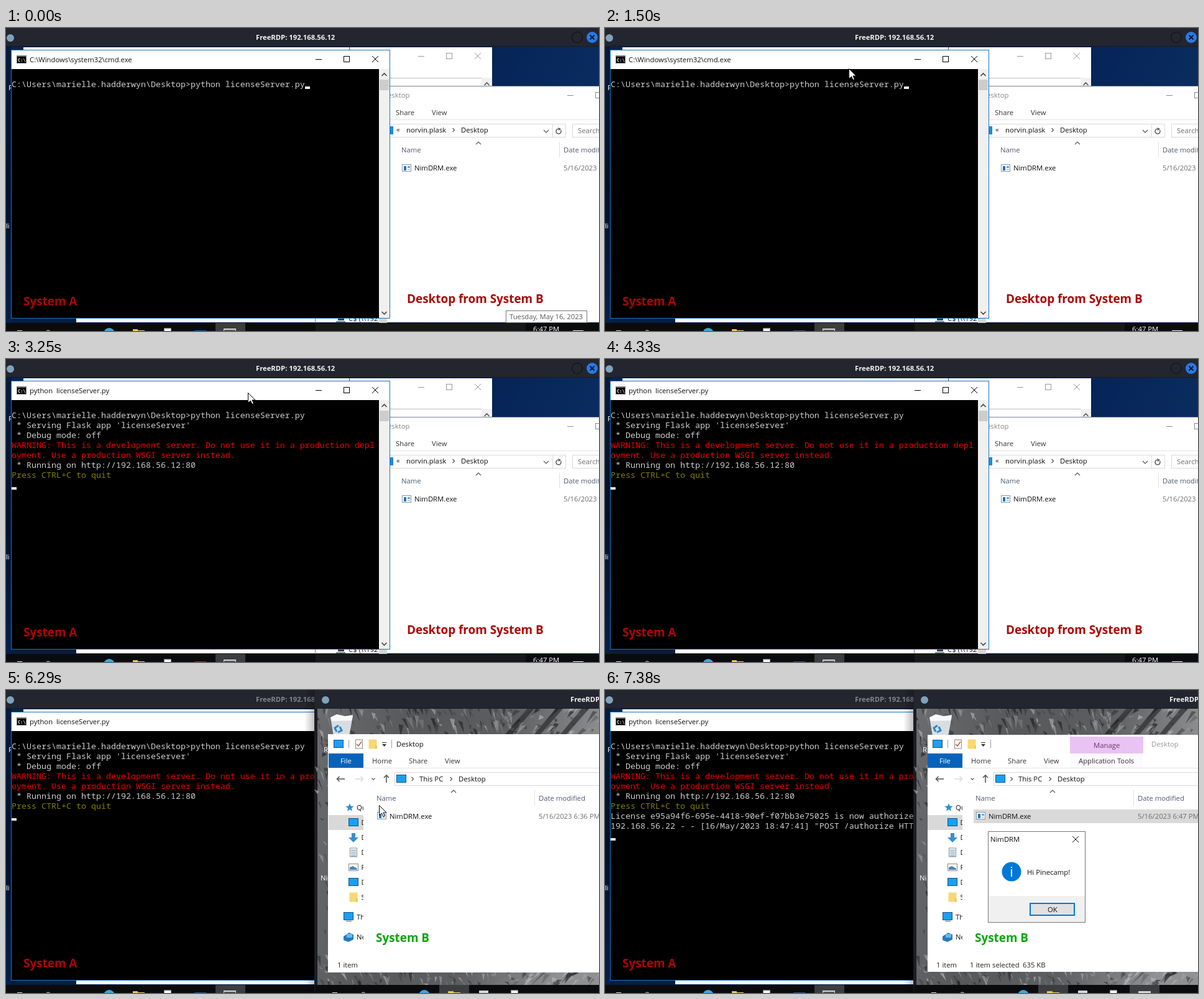
Write an HTML page with a canvas that moves like this. It is 954 px wide and 487 px high and loops after 8000 ms.

```html
<!DOCTYPE html>
<html lang="en">
<head>
<meta charset="utf-8">
<title>License server demo</title>
<style>
html, body { margin: 0; height: 100%; overflow: hidden; background: #000; }
canvas { display: block; width: 100%; height: 100%; }
</style>
</head>
<body>
<canvas id="stage" width="954" height="487"></canvas>
<script>
const ctx = document.getElementById('stage').getContext('2d');
const LOOP = 8000;
const UI = '11.3px "Open Sans", sans-serif';
const BAR = 'bold 11.25px "Noto Sans", sans-serif';
const LABEL = 'bold 18.9px "Open Sans", sans-serif';
const MONO = '13.333px "Noto Sans Mono", monospace';
const BLUE = '#0078d7', SCREEN = '#18a0f5', HEAD = '#4c5a70', FOLDER = '#f8d775';

// Drawing helpers
function rect(x, y, w, h, color) {
  ctx.fillStyle = color;
  ctx.fillRect(x, y, w, h);
}
function frame(x, y, w, h, color, width = 1) {
  ctx.strokeStyle = color;
  ctx.lineWidth = width;
  ctx.strokeRect(x + width / 2, y + width / 2, w - width, h - width);
}
function disc(x, y, r, color) {
  ctx.fillStyle = color;
  ctx.beginPath();
  ctx.arc(x, y, r, 0, 7);
  ctx.fill();
}
function text(str, x, y, color = '#111', font = UI) {
  ctx.fillStyle = color;
  ctx.font = font;
  ctx.fillText(str, x, y);
}
function trace(points) {
  ctx.beginPath();
  points.forEach(([x, y]) => ctx.lineTo(x, y));
}
function line(points, color, width = 1) {
  trace(points);
  ctx.strokeStyle = color;
  ctx.lineWidth = width;
  ctx.stroke();
}
function shape(points, color) {
  trace(points);
  ctx.closePath();
  ctx.fillStyle = color;
  ctx.fill();
}
function chevron(x, y, dx, dy, color = '#555', width = 1.2) {
  const [px, py] = dx ? [0, Math.abs(dx)] : [Math.abs(dy), 0];
  line([[x - px - dx / 2, y - py - dy / 2], [x + dx / 2, y + dy / 2],
        [x + px - dx / 2, y + py - dy / 2]], color, width);
}
function cross(x, y, r, color, width = 1) {
  line([[x - r, y - r], [x + r, y + r]], color, width);
  line([[x + r, y - r], [x - r, y + r]], color, width);
}
function windowButtons(x, y, color) {
  rect(x - 5, y, 10, 1, color);
  frame(x + 40, y - 5, 10, 10, color);
  cross(x + 91, y, 5, color);
}
function clipped(x, y, w, h, draw) {
  ctx.save();
  ctx.beginPath();
  ctx.rect(x, y, w, h);
  ctx.clip();
  draw();
  ctx.restore();
}
function gradient(x0, y0, x1, y1, ...colors) {
  const g = ctx.createLinearGradient(x0, y0, x1, y1);
  colors.forEach((c, i) => g.addColorStop(i / (colors.length - 1), c));
  return g;
}

// Small icons, placed by their centre
function monitor(x, y) {
  rect(x - 8, y - 7, 16, 13, '#17507e');
  rect(x - 7, y - 6, 14, 11, SCREEN);
}
function folder(x, y, w = 13, h = 15) {
  rect(x - w / 2, y - h / 2, w, h, FOLDER);
  rect(x + w / 2 - 2, y + h / 2 - 5, 2, 5, '#e5b94c');
}
function page(x, y, h = 15) {
  rect(x - 6, y - h / 2, 12, h, '#fafafa');
  frame(x - 6, y - h / 2, 12, h, '#8b8b8b');
}
function program(x, y) {
  rect(x - 8, y - 6, 15, 12, '#fff');
  frame(x - 8, y - 6, 15, 12, '#8996a3');
  rect(x - 5, y - 3, 4, 7, '#1976c5');
  rect(x + 1, y - 3, 4, 3, '#61a6dc');
  rect(x + 1, y + 2, 4, 1, '#9aa');
}

function titleBar(x, w, titleX, color) {
  rect(x, 0, w, 30, '#23252f');
  rect(x, 29, w, 1, '#191a21');
  disc(x + 7, 16, 6, '#7fa3bd');
  text('FreeRDP: 192.168.56.12', titleX, 19, color, BAR);
}

function taskbar(x, active) {
  rect(x, 474, 954 - x, 13, '#0a0b0d');
  active.forEach(a => rect(a, 474, 48, 13, '#3c3d40'));
  rect(x + 18, 486, 8, 1, '#ddd');
  ctx.strokeStyle = '#ddd';
  ctx.lineWidth = 1;
  ctx.beginPath();
  ctx.arc(x + 68, 490, 4, 3.4, 6);
  ctx.stroke();
  disc(x + 166, 491, 9, '#3aa7e0');
  rect(x + 204, 484, 8, 3, '#e9b94a');
  rect(x + 205, 486, 18, 1, FOLDER);
}

function desktopA(t, unfocused) {
  rect(0, 0, 954, 487, gradient(782, 30, 954, 94, '#062456', '#0a2c5f'));
  rect(0, 30, 9, 444, gradient(0, 30, 0, 474, '#051b3e', '#02102a', '#04204a'));
  text('F', 4, 100, '#fff');
  text('li', 0, 322, '#fff');
  titleBar(0, 954, 402, unfocused ? '#85868b' : '#f4f4f4');
  disc(919, 15, 9, '#0e0f13');
  disc(919, 15, 8, '#23252f');
  disc(943, 15, 9, '#267ae9');
  cross(943, 15, 3.5, '#10131b', 1.8);

  // Window at the back
  rect(28, 31, 754, 442, '#fff');
  rect(9, 466, 104, 8, '#051d40');
  rect(552, 31, 1, 5, '#555');
  windowButtons(668, 45, '#999');
  rect(617, 80, 148, 1, '#bbb');
  rect(765, 80, 17, 14, '#f0f0f0');
  chevron(773.5, 90, 0, -4, '#555', 1.6);

  // Remote share listing peeking out below
  rect(497, 466, 1, 8, '#777');
  rect(534, 466, 10, 4, '#39424a');
  rect(531, 471, 15, 2, '#788');
  text('C$ (\\\\192', 551, 471);
  rect(600, 466, 13, 8, '#d5d5d5');

  explorerA();
  consoleWindow(t);

  taskbar(0, [337]);
  rect(498, 474, 338, 13, '#161719');
  page(260, 490);
  rect(303, 486, 19, 1, '#1c5f9f');
  rect(350, 483, 20, 4, '#d5d5d5');
  rect(351, 485, 18, 2, '#555');
  text('6:47 PM', 848, 488, '#fff');
  rect(912, 486, 17, 1, '#fff');
}

function explorerA() {
  rect(617, 94, 337, 379, '#fff');
  rect(617, 93, 337, 1, '#788491');
  text('esktop', 614, 112, '#888');
  rect(903, 108, 10, 1, '#888');
  frame(948, 103, 10, 10, '#888');
  text('Share', 627, 140, '#333');
  text('View', 685, 140, '#333');
  rect(617, 147, 337, 1, '#e3e3e3');
  frame(610, 154, 291, 22, '#d9d9d9');
  rect(617, 158, 6, 13, '#1d8bdc');
  text('«', 628, 167, '#222');
  text('norvin.plask', 644, 168);
  chevron(720, 164, 3, 0);
  text('Desktop', 732, 168);
  chevron(869, 166, 0, 4);
  rect(879, 154, 1, 22, '#d9d9d9');
  ctx.strokeStyle = '#555';
  ctx.lineWidth = 1.4;
  ctx.beginPath();
  ctx.arc(889, 166, 4, -.6, 4.4);
  ctx.stroke();
  shape([[888, 160], [893, 162], [889, 165]], '#555');
  frame(911, 154, 60, 22, '#d9d9d9');
  text('Search', 920, 169, '#6d6d6d');
  text('Name', 636, 200, HEAD);
  chevron(760, 185, 0, -4);
  rect(890, 183, 1, 25, '#e1e1e1');
  text('Date modified', 897, 200, HEAD);
  program(645, 225);
  text('NimDRM.exe', 657, 229);
  text('5/16/2023 6:36 PM', 897, 229, '#6d6d6d');
  text('Desktop from System B', 645, 442, '#ad0505', LABEL);
}

const PROMPT = ['C:\\Users\\marielle.hadderwyn\\Desktop>python licenseServer.py', '#ccc'];
const STARTUP = [
  [" * Serving Flask app 'licenseServer'", '#ccc'],
  [' * Debug mode: off', '#ccc'],
  ['WARNING: This is a development server. Do not use it in a production depl', '#f00000'],
  ['oyment. Use a production WSGI server instead.', '#f00000'],
  [' * Running on http://192.168.56.12:80', '#ccc'],
  ['Press CTRL+C to quit', '#808000']
];
const REQUEST = [
  ['License e95a94f6-695e-4418-90ef-f07bb3e75025 is now authorized', '#ccc'],
  ['192.168.56.22 - - [16/May/2023 18:47:41] "POST /authorize HTTP/1.1" 200 -', '#ccc']
];
const RUN = 2650, SERVING = 3250, SPLIT = 5260, CLICK = 6830, LAUNCH = 7040, DIALOG = 7180;

function consoleWindow(t) {
  rect(8, 35, 610, 432, '#1677c7');
  rect(9, 36, 608, 30, '#fff');
  rect(17, 44, 16, 13, '#777');
  rect(18, 46, 14, 10, '#000');
  text('C:\\', 19, 54, '#fff', 'bold 7px "DejaVu Sans Mono", monospace');
  text(t < RUN ? 'C:\\Windows\\system32\\cmd.exe' : 'python  licenseServer.py', 38, 55);
  windowButtons(503, 50, '#000');
  rect(9, 66, 591, 400, '#000');
  rect(600, 66, 17, 400, '#f0f0f0');
  rect(601, 83, 15, 17, '#cdcdcd');
  chevron(608.5, 75, 0, -4, '#444', 1.6);
  chevron(608.5, 458, 0, 4, '#444', 1.6);

  const lines = [PROMPT];
  if (t >= SERVING) lines.push(...STARTUP);
  if (t >= DIALOG) lines.push(...REQUEST);
  lines.forEach(([str, color], i) => text(str, 9, 95 + 16 * i, color, MONO));
  const typed = t < RUN;
  rect(typed ? 481 : 9, typed ? 94 : 94 + 16 * lines.length, 8, 4, '#f2f2f2');
  text('System A', 28, 446, '#ad0505', LABEL);
}

// Rough stone: slanted shards of light and shadow over a soft base
function rockWallpaper() {
  rect(501, 30, 453, 457, gradient(501, 30, 954, 120, '#6a6c6e', '#56585a', '#5c5e60', '#8e9092'));
  let seed = 11;
  const random = () => (seed = seed * 16807 % 2147483647) / 2147483647;
  for (let i = 0; i < 1500; i++) {
    const x = 495 + random() * 465, y = 20 + random() * 460;
    const height = 4 + random() * 18, width = 2 + random() * 7;
    const lean = (x > 810 ? -.8 : .25) * height + (random() - .5) * 8;
    const shade = random() < .54 ? '28,30,32' : '185,187,189';
    shape([[x, y], [x + width, y + random() * 5], [x + lean + width * random(), y + height]],
      `rgba(${shade},${.2 + random() * .45})`);
  }
  for (const x of [838, 884, 926]) {
    shape([[x, 30], [x + 12, 30], [x - 24, 71], [x - 34, 71]], 'rgba(30,32,34,.6)');
  }
}

function recycleBin() {
  shape([[522, 44], [558, 42], [552, 74], [527, 74]], '#d8dde1');
  shape([[522, 44], [532, 39], [545, 42], [558, 40], [556, 49], [524, 50]], '#f7f8f8');
  line([[535, 57], [529, 61], [532, 67]], '#2689d8', 3);
  line([[537, 59], [540, 65], [534, 68]], '#2689d8', 3);
}

function desktopB(t) {
  rect(496, 0, 5, 487, '#1d1e25');
  rockWallpaper();
  titleBar(507, 447, 908, '#f4f4f4');
  rect(497, 0, 10, 30, '#23252f');
  recycleBin();
  text('R', 511, 100, '#fff');
  text('Ni', 506, 306, '#fff');
  explorerB(t);
  taskbar(507, t >= DIALOG ? [697, 844] : [697]);
  rect(497, 474, 10, 13, '#0a0b0d');
  rect(711, 484, 9, 3, '#e9b94a');
  rect(711, 486, 20, 1, FOLDER);
  rect(761, 483, 15, 4, '#cfd6dc');
  page(818, 490);
  if (t >= DIALOG) {
    rect(858, 484, 20, 3, '#d5d5d5');
    dialog();
  }
}

function explorerB(t) {
  const launched = t >= LAUNCH;
  const inset = t >= DIALOG ? 1 : 0;
  rect(518 + inset, 71 + inset, 436, 383 - 2 * inset, '#fff');
  monitor(535, 87);
  rect(551, 80, 1, 13, '#999');
  page(568, 87);
  line([[564, 87], [567, 90], [572, 83]], '#b4572b', 1.4);
  folder(590, 87);
  rect(605, 84, 7, 1, '#333');
  shape([[605, 87], [612, 87], [608.5, 91]], '#333');
  rect(620, 80, 1, 13, '#999');
  if (launched) {
    rect(748, 75, 118, 27, '#e9c3f3');
    rect(748, 102, 118, 23, '#fdf9fe');
    text('Manage', 786, 93, '#65396f');
    text('Application Tools', 762, 118, '#333');
    text('Desktop', 879, 91, '#999');
  } else {
    text('Desktop', 628, 91);
  }
  rect(519, 102, 56, 23, '#0763b9');
  text('File', 538, 118, '#fff');
  text('Home', 589, 118, '#333');
  text('Share', 648, 118, '#333');
  text('View', 706, 118, '#333');
  rect(519, 125, 435, 1, '#e3e3e3');

  // Navigation and address
  line([[545, 143], [533, 143]], '#555', 1.6);
  chevron(534.5, 143, -4, 0, '#555', 1.6);
  line([[562, 143], [574, 143]], '#ddd', 1.6);
  chevron(572.5, 143, 4, 0, '#ddd', 1.6);
  chevron(591, 143, 0, 2.5);
  line([[612, 149], [612, 138]], '#555', 1.6);
  chevron(612, 139, 0, -4, '#555', 1.6);
  frame(625, 132, 340, 22, '#d9d9d9');
  monitor(636, 143);
  chevron(654, 143, 3, 0);
  text('This PC', 665, 147);
  chevron(716, 143, 3, 0);
  text('Desktop', 728, 147);
  chevron(720, 163, 0, -4);
  text('Name', 596, 178, HEAD);
  rect(850, 161, 1, 25, '#e1e1e1');
  text('Date modified', 857, 178, HEAD);

  clipped(518, 160, 57, 270, sidebar);

  // File row: hovered, selected, then selected without focus
  const pointer = pointerAt(t);
  if (t >= DIALOG) rect(593, 192, 361, 22, '#d9d9d9');
  else if (t >= CLICK) {
    rect(593, 192, 361, 22, '#c6e2f7');
    frame(593, 192, 370, 22, '#9acdf2');
  } else if (pointer && pointer[0] > 593 && pointer[1] >= 192) rect(593, 192, 361, 22, '#e5f3ff');
  program(605, 202);
  text('NimDRM.exe', 617, 207);
  text(t >= DIALOG ? '5/16/2023 6:47 PM' : '5/16/2023 6:36 PM', 857, 207, '#6d6d6d');
  text('System B', 595, 405, '#0ca50c', LABEL);
  text('1 item', 533, 446, '#222');
  if (launched) {
    text('1 item selected', 587, 446, '#222');
    text('635 KB', 672, 446, '#222');
  }
}

function sidebar() {
  const star = Array.from({ length: 10 }, (_, i) => {
    const a = i * Math.PI / 5 - Math.PI / 2, r = i % 2 ? 3 : 7;
    return [553 + r * Math.cos(a), 189 + r * Math.sin(a)];
  });
  shape(star, '#2d8fd8');
  text('Quick access', 564, 193);
  rect(519, 201, 56, 24, '#d9d9d9');
  ['Desktop', 'Downloads', 'Documents', 'Pictures', 'Desktop', 'System']
    .forEach((name, i) => text(name, 571.5, 217 + 24 * i));
  monitor(559, 213);
  shape([[556, 230], [562, 230], [562, 237], [567, 237], [559, 245], [551, 237], [556, 237]], '#3790ce');
  page(559, 261);
  for (let y = 257; y < 267; y += 3) rect(555, y, 8, 1, '#3f86b9');
  rect(551, 279, 16, 12, '#fff');
  frame(551, 279, 16, 12, '#888');
  shape([[553, 289], [553, 285], [558, 283], [565, 287], [565, 289]], '#4b87ab');
  monitor(559, 309);
  folder(559, 333);
  monitor(551, 364);
  rect(547, 371, 9, 1, '#567');
  text('This PC', 564, 369);
  shape([[543, 396], [552, 390], [559, 393], [559, 401], [551, 405], [543, 402]], '#287bb9');
  rect(548, 392, 9, 6, '#65baf0');
  text('Network', 564, 401);
}

function dialog() {
  rect(616, 227, 157, 147, '#777');
  rect(617, 228, 155, 145, '#fff');
  rect(617, 331, 155, 42, '#f0f0f0');
  text('NimDRM', 620, 244);
  cross(757, 240, 5, '#111');
  disc(654, 292, 15.5, BLUE);
  rect(653, 284, 2, 2, '#fff');
  rect(653, 288, 2, 12, '#fff');
  text('Hi Pinecamp!', 679, 297);
  rect(683, 342, 73, 21, '#e1e1e1');
  frame(683, 342, 73, 21, BLUE, 2);
  text('OK', 712, 357);
}

// Pointer moves in steps along quadratic curves
const MOVES = [
  { start: 810, end: 1560, steps: 12, power: 1.5, path: [[890, 470], [440, 230], [389, 55]] },
  { start: 3980, end: 4260, steps: 5, power: 1, path: [[400, 58], [600, 92], [840, 36]] },
  { start: 5950, end: 6220, steps: 5, power: 1, path: [[942, 86], [740, 100], [565, 165]] },
  { start: 6290, end: 6430, steps: 3, power: 1, path: [[600, 185], [640, 200], [666, 202]] },
  { start: 7110, end: 7310, steps: 4, power: 1, path: [[685, 180], [760, 110], [850, 33]] }
];

function pointerAt(t) {
  if (t < 810 || t >= 7380 || (t >= 4330 && t < 5950)) return null;
  if (t >= 1630 && t < 3980) return [389, 54];
  const { start, end, steps, power, path: [a, b, c] } = MOVES.filter(m => t >= m.start).pop();
  const gap = (end - start) / (steps - 1);
  const k = Math.min(1, Math.floor((t - start) / gap + 1e-6) / (steps - 1));
  const v = (1 - k) ** power, u = 1 - v;
  return [0, 1].map(i => Math.round(v * v * a[i] + 2 * u * v * b[i] + u * u * c[i]));
}

function drawPointer(t) {
  const p = pointerAt(t);
  if (!p) return;
  const pressed = [[1770, 1930], [CLICK, 6900], [6970, LAUNCH]].some(([from, to]) => t >= from && t < to);
  if (pressed) disc(p[0], p[1], 12, 'rgba(240,228,80,.85)');
  ctx.save();
  ctx.translate(p[0] + .5, p[1] + .5);
  const arrow = [[0, 0], [0, 16], [4, 12.5], [6.5, 18], [9, 17], [6.5, 11.5], [11.5, 11.5], [0, 0]];
  shape(arrow, '#fff');
  line(arrow, '#000');
  ctx.restore();
}

function tooltip() {
  rect(804, 454, 131, 20, '#fff');
  frame(804, 454, 131, 20, '#777');
  text('Tuesday, May 16, 2023', 810, 468, '#575757');
}

function draw() {
  const t = performance.now() % LOOP;
  const split = t >= SPLIT;
  desktopA(t, split);
  if (t < 880) tooltip();
  if (split) {
    rect(480, 0, 16, 487, gradient(480, 0, 496, 0, 'rgba(0,0,0,0)', 'rgba(0,0,0,.25)'));
    clipped(496, 0, 458, 487, () => desktopB(t));
  }
  drawPointer(t);
  requestAnimationFrame(draw);
}
draw();
</script>
</body>
</html>
```
